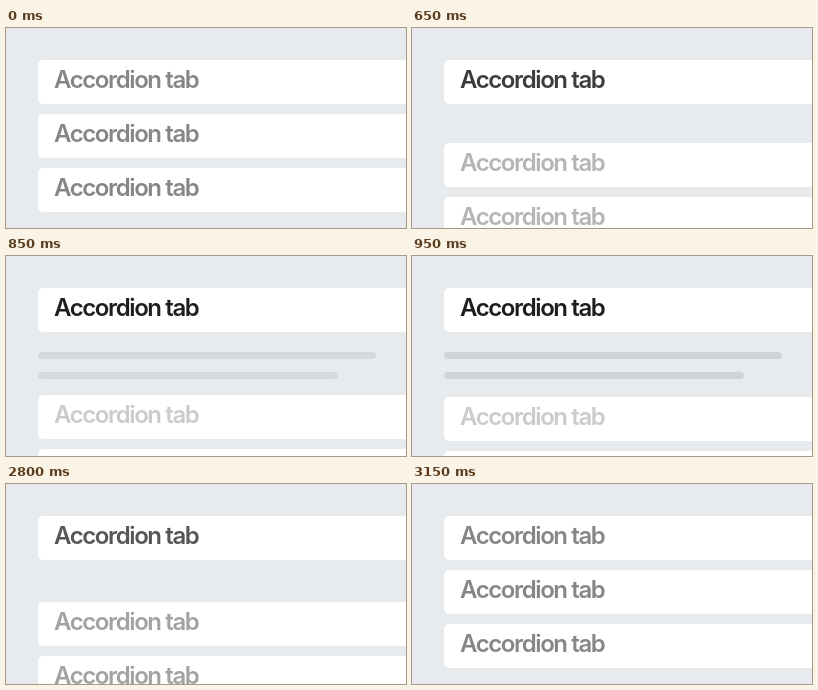
These frames come from a looping animation (400 by 200 pixels, 5 s). An HTML page:

```html
<!DOCTYPE html>
<html lang="en">
<head>
<meta charset="utf-8">
<title>Accordion</title>
<style>
  html, body { margin: 0; width: 100%; height: 100%; overflow: hidden; background: #e7ebee; }
  .stage { position: relative; width: 400px; height: 200px; overflow: hidden; background: #e7ebee; }
  .tab {
    position: absolute; left: 32px; width: 400px; height: 44px;
    box-sizing: border-box; padding-left: 16px;
    border-radius: 5px; background: #fff; color: #868686;
    font: 600 24px/39px Inter, "Liberation Sans", sans-serif;
    letter-spacing: -1.4px; white-space: nowrap;
  }
  .line { position: absolute; left: 32px; height: 7px; border-radius: 3.5px; background: #d0d4d7; opacity: 0; }
</style>
</head>
<body>
<div class="stage">
  <div class="line" style="top:96px;width:338px"></div>
  <div class="line" style="top:116px;width:300px"></div>
  <div class="tab" style="top:32px">Accordion tab</div>
  <div class="tab" style="top:86px">Accordion tab</div>
  <div class="tab" style="top:140px">Accordion tab</div>
</div>
<script>
const LOOP = 5000, STEP = 50, DROP = 54.6;
const GREY = 134, DARK = 29, PALE = 203;
const tabs = document.querySelectorAll('.tab');
const lines = document.querySelectorAll('.line');

const clamp = x => Math.min(1, Math.max(0, x));
const easeOut = x => 1 - (1 - x) ** 3;

// cubic-bezier(.25, .1, .25, 1)
function ease(x) {
  let lo = 0, hi = 1;
  for (let i = 0; i < 24; i++) {
    const s = (lo + hi) / 2;
    if (0.75 * s * (1 - s) + s ** 3 < x) lo = s; else hi = s;
  }
  const s = (lo + hi) / 2;
  return 0.3 * s * (1 - s) ** 2 + 3 * s * s * (1 - s) + s ** 3;
}

const part = (t, start, length, curve = ease) => curve(clamp((t - start) / length));

const grey = (to, p) => {
  const v = Math.round(GREY + (to - GREY) * p);
  return `rgb(${v},${v},${v})`;
};

function draw(time) {
  const t = Math.floor(time % LOOP / STEP) * STEP;
  const opening = t < 2000;
  const open = opening ? part(t, 514, 440) : 1 - part(t, 2685, 460);
  const active = opening ? part(t, 500, 450, easeOut) : 1 - part(t, 2690, 350);
  const faded = opening ? part(t, 514, 340) : 1 - part(t, 2690, 320);
  const shown = opening ? part(t, 754, 196) : 1 - part(t, 2685, 105);

  tabs.forEach((tab, i) => {
    tab.style.top = 32 + 54 * i + (i ? DROP * open : 0) + 'px';
    tab.style.color = i ? grey(PALE, faded) : grey(DARK, active);
  });
  lines.forEach(line => { line.style.opacity = shown; });
}

const begin = performance.now();
function tick() {
  draw(performance.now() - begin);
  requestAnimationFrame(tick);
}
draw(0);
requestAnimationFrame(tick);
</script>
</body>
</html>
```
